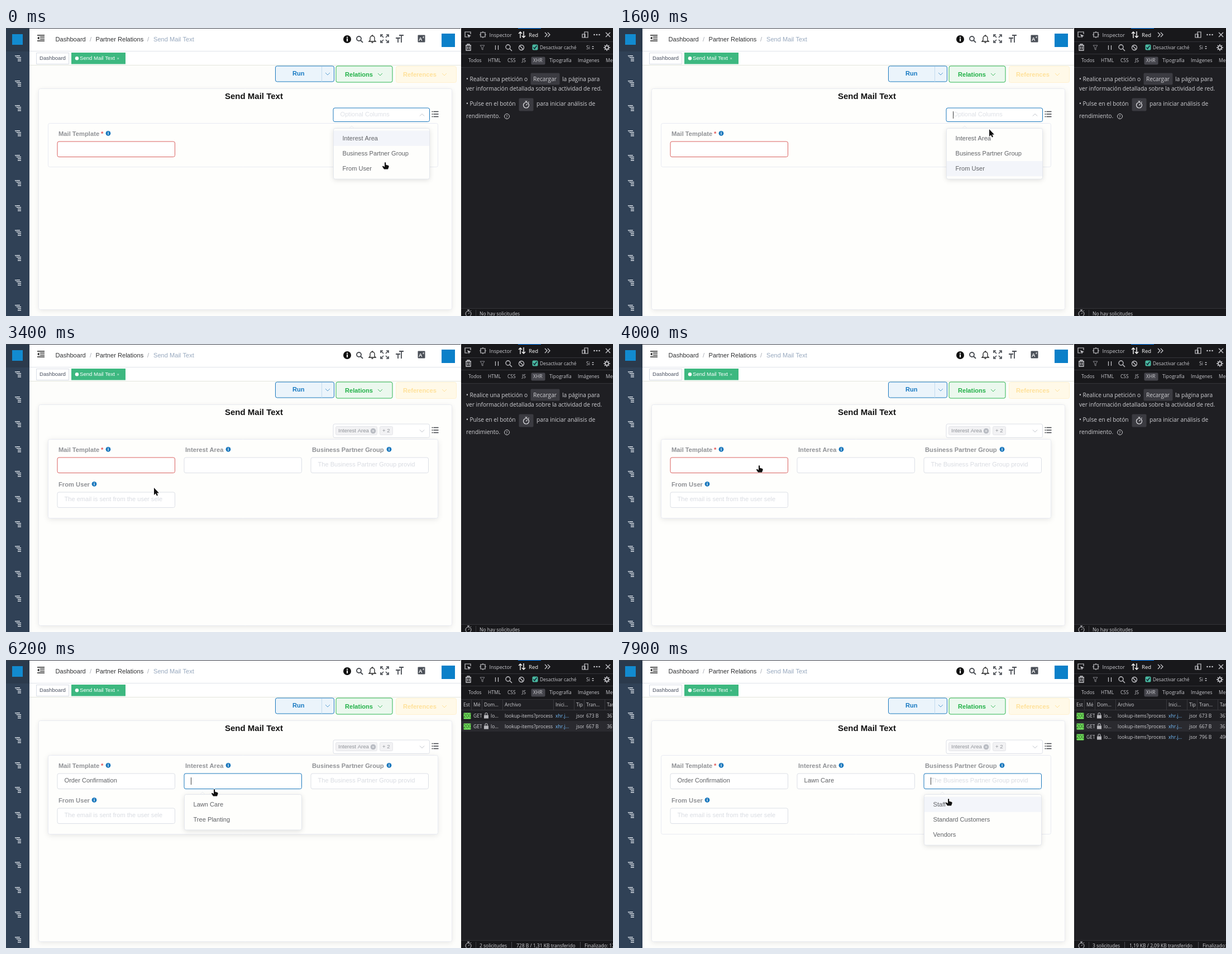
Recreate the animation shown at these times as an HTML page with a canvas. Size 1087 by 515 pixels, loop 8 s.

```html
<!DOCTYPE html>
<html lang="en">
<head>
<meta charset="utf-8">
<title>Send Mail Text</title>
<style>
html, body { margin: 0; width: 100%; height: 100%; overflow: hidden; background: #fff; }
canvas { display: block; width: 1087px; height: 515px; }
</style>
</head>
<body>
<canvas id="stage" width="1087" height="515"></canvas>
<script>
const g = document.getElementById('stage').getContext('2d');
const SANS = '"Liberation Sans", Arial, sans-serif';
const TOOL = '"Open Sans", "Noto Sans", sans-serif';
const BLUE = '#1a78bd', GREY = '#606266', EDGE = '#dcdfe6', PALE = '#d9dce2';
const LOOP = 8000, STEP = 100;

// Moments at which the interface changes
const PICK = [2000, 2350, 2750], COLS_CLOSE = 3000;
const MAIL = { open: 4400, pick: 5000 };
const AREA = { open: 5800, pick: 6600 };
const GROUP = { open: 7450, pick: LOOP };

const PATH = [
  [0, 678, 241], [300, 676, 248], [1200, 672, 246], [1500, 663, 181], [1700, 663, 181],
  [1900, 655, 198], [2100, 655, 198], [2300, 655, 224], [2400, 655, 224], [2600, 648, 250],
  [2800, 648, 250], [3400, 265, 257], [3600, 262, 250], [4000, 250, 218], [4400, 250, 218],
  [4700, 250, 256], [5000, 250, 258], [5500, 372, 220], [5900, 372, 222], [6200, 372, 232],
  [6450, 368, 256], [6600, 368, 258], [7100, 603, 215], [7400, 603, 216], [7900, 589, 249]
];

function pointer(t) {
  let i = 0;
  while (i < PATH.length - 2 && t >= PATH[i + 1][0]) i++;
  const [t0, x0, y0] = PATH[i], [t1, x1, y1] = PATH[i + 1];
  const p = Math.min(1, (t - t0) / (t1 - t0)), e = p * p * (3 - 2 * p);
  return { x: x0 + (x1 - x0) * e, y: y0 + (y1 - y0) * e };
}

function text(s, x, y, size, color, weight = 400, family = SANS) {
  g.font = `${weight} ${size}px ${family}`;
  g.fillStyle = color;
  g.fillText(s, x, y);
}
const tool = (s, x, y, color = '#d0d0d4', size = 8.5) => text(s, x, y, size, color, 400, TOOL);

function rect(x, y, w, h, color) {
  g.fillStyle = color;
  g.fillRect(x, y, w, h);
}

function box(x, y, w, h, fill, edge, r = 3, lw = 1) {
  g.beginPath();
  g.roundRect(x + .5, y + .5, w - 1, h - 1, r);
  if (fill) { g.fillStyle = fill; g.fill(); }
  if (edge) { g.strokeStyle = edge; g.lineWidth = lw; g.stroke(); }
}

function shadowBox(x, y, w, h, edge, alpha, blur) {
  g.save();
  g.shadowColor = `rgba(0,0,0,${alpha})`;
  g.shadowBlur = blur;
  g.shadowOffsetY = 2;
  box(x, y, w, h, '#fefefc');
  g.restore();
  box(x, y, w, h, '#fefefc', edge);
}

function disc(x, y, r, color) {
  g.beginPath();
  g.arc(x, y, r, 0, 7);
  g.fillStyle = color;
  g.fill();
}

// SVG path placed at x, y; stroked unless lw is 0
function icon(d, x, y, color, lw = 1.2) {
  const p = new Path2D(d);
  g.save();
  g.translate(x, y);
  g.lineWidth = lw;
  g.strokeStyle = g.fillStyle = color;
  lw ? g.stroke(p) : g.fill(p);
  g.restore();
}

const chevron = (x, y, color, up) => icon(up ? 'M-4 2L0-2L4 2' : 'M-4-2L0 2L4-2', x, y, color, 1);
const SEARCH = 'M4 0A4 4 0 1 1-4 0A4 4 0 1 1 4 0M3 3L7 7';
const WATCH = 'M5 1A5 5 0 1 1-5 1A5 5 0 1 1 5 1M-2-6H2M0-6V-4M0 1L2-1M4-4L5-5';
const RING = 'M4.5 0A4.5 4.5 0 1 1-4.5 0A4.5 4.5 0 1 1 4.5 0';

function info(x, y, r = 4.4, color = BLUE) {
  disc(x, y, r, color);
  const k = r / 4.4;
  rect(x - .6 * k, y - .8 * k, 1.3 * k, 3.2 * k, '#fff');
  rect(x - .6 * k, y - 2.7 * k, 1.3 * k, 1.2 * k, '#fff');
}

function sidebar() {
  rect(0, 0, 42, 515, '#304156');
  rect(0, 0, 42, 42, '#2b3a4c');
  rect(11, 11, 19, 19, '#128bd0');
  for (let i = 0; i < 11; i++) {
    const y = Math.round(54 + i * 44.6) - 5;
    rect(16, y, 9, 1.4, '#e3e8ee');
    rect(17.5, y, 1, 4, '#8c99a8');
    for (let k = 1; k < 4; k++) rect(k === 1 ? 19 : 21, y + k * 3, k === 1 ? 8 : 6, 1.4, '#e3e8ee');
  }
}

function navbar() {
  icon('M-6-5H7M-1-1.7H7M-1 1.7H7M-6 5H7', 62, 18, '#222', 1.5);
  icon('M-6 0L-2.5-3V3Z', 62, 18, '#222', 0);
  text('Dashboard', 88.5, 24, 11.1, '#303133');
  text('/', 150, 24, 11.1, '#a5a9b2');
  text('Partner Relations', 160.5, 24, 11.1, '#303133');
  text('/', 253, 24, 11.1, '#a5a9b2');
  text('Send Mail Text', 264, 24, 11.1, '#97a8be');
  info(611, 20, 7, '#111');
  icon(SEARCH, 632, 19, '#4b4f55', 1.9);
  icon('M-6 4H6L4 2V-2A4 4 0 0 0-4-2V2ZM-1.5 6H1.5M0-6V-8', 656, 20, '#222', 1.3);
  icon('M-7-3V-7H-3M3-7H7V-3M7 3V7H3M-3 7H-7V3M-6-6L-2-2M6-6L2-2M6 6L2 2M-6 6L-2 2', 678, 19, '#4b4f55', 1.7);
  icon('M-7-1H1M-3-1V7M-1-6H7M3-6V7', 705, 19, '#4b4f55', 1.8);
  box(737, 12, 14, 14, '#4b5058', null, 1);
  text('A', 739, 23, 9, '#fff', 700);
  text('z', 746, 18, 6, '#fff', 700);
  rect(780, 10, 24, 24, '#0b80c9');
  rect(42, 41, 773, 1, '#dfe3ea');
  box(54, 44, 59, 21, '#fff', '#d8dce5', 0);
  text('Dashboard', 60, 57, 9.6, '#495060');
  rect(117, 44, 97, 20.5, '#3db880');
  disc(127, 54.2, 3.2, '#fff');
  text('Send Mail Text', 132, 57, 9.6, '#fff');
  text('×', 198.5, 57, 7.5, '#d6f2e4');
  rect(42, 66, 773, 1, '#e3e6dc');
}

function actions() {
  box(482, 67.5, 106, 29, '#ebf4fb', BLUE, 3);
  rect(565, 69, 1, 27, '#c3dcef');
  text('Run', 513, 85, 11.1, '#1779c2', 700);
  chevron(576, 82, '#5a9fd2');
  box(590.5, 67.5, 102, 30, '#ebf8ee', '#2cb550', 3);
  text('Relations', 607, 87, 11.1, '#22b148', 700);
  chevron(670, 83, '#45bb64');
  box(698, 68, 109, 30, '#fff9e8', '#fff1cf', 3);
  text('References', 711, 87, 11.1, '#ffe19a', 700);
  chevron(785, 83, '#ffe19a');
}

function label(s, x, y, mark, required) {
  text(s, x, y, 11.2, '#909296', 700);
  if (required) text('*', 170, y, 11.2, '#e05656', 700);
  info(mark, y - 4.7);
}

function field(x, y, edge, value, hint, caret) {
  box(x - .5, y - .5, 211.5, 28.5, '#fff', edge, 3);
  if (value) text(value, x + 12.5, y + 16, 11.1, GREY);
  else if (hint) text(hint, x + 12.5, y + 16, 11.1, PALE);
  if (caret) rect(x + 12, y + 7, 1, 13, '#444');
}

function popup(x, y, w, items, hover, chosen = 0) {
  const h = items.length * 27.2 + 10;
  shadowBox(x, y, w, h, '#e4e7ed', .13, 10);
  icon('M-5 1L0-4L5 1', x + 33, y, '#e8ebf0', 1);
  items.forEach((s, i) => {
    const top = y + 4.5 + i * 27.2;
    if (i === hover) rect(x + 1, top, w - 2, 27.2, '#f3f5fa');
    const on = i < chosen;
    text(s, x + 16.5, Math.round(top + 17.2), 11.1, on ? BLUE : GREY, on ? 700 : 400);
    if (on) icon('M-4 0L-1 3L4-3', x + w - 16, top + 14, BLUE, 1.2);
  });
}

function tag(x, w, s) {
  box(x, 147, w, 16, '#f2f2f4', '#e4e5e9', 2);
  text(s, x + 5, 158, 9.6, '#909399');
}

const blink = (t, start) => (t - start) % 1000 < 500;
const isOpen = (list, t) => t >= list.open && t < list.pick;
const rowAt = (y, top) => y < top ? -1 : Math.floor((y - top) / 27.2);

function form(t, m) {
  const picked = PICK.filter(p => t >= p).length;
  const colsOpen = t < COLS_CLOSE;
  const anyList = [MAIL, AREA, GROUP].some(l => isOpen(l, t));
  const bottom = picked > 2 ? 312 : 249;

  shadowBox(58, 108, 741, 396, '#e9ebf1', .09, 10);
  text('Send Mail Text', 392, 127, 15, '#111', 700);

  const inside = m.x > 75 && m.x < 774 && m.y > 170 && m.y < bottom;
  const lifted = inside && !colsOpen && !(anyList && m.y > 239);
  shadowBox(75, 170, 699, bottom - 170, '#e8eaf2', lifted ? .1 : 0, 11);

  box(585.5, 142.5, 173.5, 25.5, '#fff', colsOpen ? BLUE : EDGE, 3);
  if (picked) {
    tag(590, 75, 'Interest Area');
    disc(657.5, 155.5, 4.8, '#b9bcc3');
    icon('M-1.5-1.5L1.5 1.5M1.5-1.5L-1.5 1.5', 657.5, 155.5, '#fff', .9);
    if (picked > 1) tag(669, 24, '+ ' + (picked - 1));
  } else {
    text('Optional Columns', 598.5, 158, 11.1, '#dde0e6');
  }
  if (colsOpen && blink(t, -700)) rect(picked ? 698 : 598, 149, 1, 13, '#444');
  chevron(745, 155.5, '#bcc0c8', colsOpen);
  icon('M-3-4.5H6M-3 0H6M-3 4.5H6M-6-4.5H-4M-6 0H-4M-6 4.5H-4', 768.5, 154, '#3c3f44', 1.7);

  label('Mail Template', 94, 193, 183, true);
  field(92, 203, t < MAIL.pick ? '#d9605f' : EDGE, t >= MAIL.pick && 'Order Confirmation', '',
    isOpen(MAIL, t) && blink(t, MAIL.open));
  if (picked) {
    label('Interest Area', 321, 193, 398);
    const focus = t >= AREA.open && t < GROUP.open;
    field(319, 203, focus ? BLUE : EDGE, t >= AREA.pick && 'Lawn Care', '',
      isOpen(AREA, t) && blink(t, AREA.open));
  }
  if (picked > 1) {
    label('Business Partner Group', 548, 193, 686);
    const over = m.x > 546 && m.x < 757 && m.y > 203 && m.y < 231;
    field(546, 203, t >= GROUP.open ? BLUE : over ? '#c0c4cc' : EDGE, '',
      'The Business Partner Group provid', t >= GROUP.open && blink(t, GROUP.open));
  }
  if (picked > 2) {
    label('From User', 94, 255, 158);
    field(92, 265, EDGE, '', 'The email is sent from the user sele');
  }

  if (colsOpen) {
    const hover = t < 200 ? 0 : t < 1700 ? 2 : rowAt(m.y, 183.5);
    popup(586, 179, 173, ['Interest Area', 'Business Partner Group', 'From User'], hover, picked);
  }
  const hover = rowAt(m.y, 244.5);
  if (isOpen(MAIL, t)) popup(92, 240, 211, ['Order Confirmation', 'Password Reset'], hover);
  if (isOpen(AREA, t)) popup(319, 240, 211, ['Lawn Care', 'Tree Planting'], hover);
  if (isOpen(GROUP, t)) popup(546, 240, 211, ['Staff', 'Standard Customers', 'Vendors'], hover);
}

function toolbars() {
  const c = '#c9c9ce';
  rect(815, 0, 272, 515, '#1f1f23');
  rect(815, 0, 272, 70, '#18181b');
  for (const y of [24, 46, 70]) rect(815, y, 272, 1, '#343439');
  rect(917, 0, 41, 1, '#0a84ff');

  icon('M0 4H-5V-5H5V-1', 827, 12, c);
  icon('M-1-1L6 2L3 3L2 6Z', 827, 12, c, 0);
  icon('M-4-4H4V4H-4ZM0-6V-4M0 4V6M-6 0H-4M4 0H6', 854, 12, c);
  tool('Inspector', 865.5, 16, c, 9.2);
  icon('M-3 6V-5M-6-2L-3-5L0-2M3-6V5M0 2L3 5L6 2', 924, 12, '#fff', 1.4);
  tool('Red', 936, 16, '#fff', 9.6);
  icon('M-5-4L-1 0L-5 4M0-4L4 0L0 4', 970, 12, c, 1.3);
  icon('M-1-5H5V5H-1ZM-5-1H0V5H-5Z', 1037, 12, c);
  for (let i = -1; i < 2; i++) disc(1058 + i * 4.5, 12, 1.3, c);
  icon('M-4-4L4 4M4-4L-4 4', 1078, 12, c, 1.3);

  icon('M-5-4H5M-2-4V-6H2V-4M-4-4V5H4V-4M-1.5-2V3M1.5-2V3', 828, 35, c, 1.3);
  icon('M-4-4H4L1 0V4L-1 3V0Z', 853, 35, '#85858b', 1);
  icon('M-2.5-4V4M2.5-4V4', 879, 35, c);
  icon(SEARCH, 899, 34, c, 1.3);
  icon(RING + 'M-3-3L3 3', 923, 35, c, 1.3);
  box(942, 29, 11, 11, '#49b8a0', null, 2);
  icon('M-3 0L-1 2.5L3-3', 947.5, 34.5, '#123', 1.5);
  tool('Desactivar caché', 956, 38, c, 8.4);
  tool('Si', 1039, 38, c);
  icon('M-2-1L0-3L2-1ZM-2 1L0 3L2 1Z', 1051, 35, c, 0);
  icon('M3 0A3 3 0 1 1-3 0A3 3 0 1 1 3 0M0-6V-3M0 3V6M-6 0H-3M3 0H6M-4-4L-2-2M2 2L4 4M4-4L2-2M-2 2L-4 4', 1076, 35, c, 1.6);

  box(940, 51, 26, 15, '#45454c', null, 2);
  const tabs = { Todos: 828, HTML: 863, CSS: 898, JS: 924, XHR: 944, Tipografía: 973, Imágenes: 1024, Me: 1074 };
  for (const name in tabs) tool(name, tabs[name], 61, c);
}

function emptyNetwork() {
  const c = '#cfcfd3', say = (s, x, y) => tool(s, x, y, c, 10.2);
  say('• Realice una petición o', 824, 95);
  box(939, 80, 53, 22, '#3b3b41', null, 2);
  say('Recargar', 944, 95);
  say('la página para', 996, 95);
  say('ver información detallada sobre la actividad de red.', 824, 112);
  say('• Pulse en el botón', 824, 139);
  box(918, 125, 27, 24, '#3b3b41', null, 2);
  icon(WATCH, 931.5, 137, '#e6e6ea');
  say('para iniciar análisis de', 950, 139);
  say('rendimiento.', 824, 161);
  icon(RING, 897, 158, c, 1);
  tool('?', 895, 161, c, 8);
}

function cells(list, y, colors = {}) {
  const left = [819, 837, 856, 893, 984, 1021, 1039, 1076];
  list.forEach((s, i) => {
    g.save();
    g.beginPath();
    g.rect(left[i] - 3, y - 14, (left[i + 1] || 1091) - left[i] - 1, 20);
    g.clip();
    tool(s, left[i] + (i === 2 && colors[0] ? 12 : 0), y, colors[i]);
    g.restore();
  });
}

function requests(n) {
  rect(815, 89, 272, 1, '#38383d');
  for (const x of [833, 852, 889, 980, 1017, 1035, 1072]) rect(x, 71, 1, 18, '#38383d');
  cells(['Est', 'Mé', 'Dom…', 'Archivo', 'Inici…', 'Tip', 'Tran…', 'Tamaño'], 83);
  const sizes = [['673 B', '367 B'], ['667 B', '361 B'], ['796 B', '490 B']];
  for (let i = 0; i < n; i++) {
    const y = Math.round(90 + i * 19.2);
    if (i === 1) rect(815, y, 272, 19, '#2a2a2f');
    box(819, y + 4, 14, 12, '#74e45e', null, 1);
    cells(['200', 'GET', 'lo…', 'lookup-items?process', 'xhr.j…', 'json', ...sizes[i]], y + 13,
      { 0: '#1f4a1a', 4: '#75bfff' });
    rect(856, y + 8.5, 8, 6, '#b5b5ba');
    icon('M-2 1V-1A2 2 0 0 1 2-1V1', 860, y + 7.5, '#b5b5ba');
  }
}

function footer(n) {
  rect(815, 502, 272, 13, '#18181b');
  rect(815, 501, 272, 1, '#343439');
  icon(WATCH, 828, 510, '#c9c9ce', 1);
  rect(841, 504, 1, 11, '#38383d');
  if (!n) return tool('No hay solicitudes', 848, 514);
  const [count, sent, a, b] = [
    ['Una solicitud', '367 B / 673 B transferido', 907, 1023],
    ['2 solicitudes', '728 B / 1,31 KB transferido', 905, 1028],
    ['3 solicitudes', '1,19 KB / 2,09 KB transferido', 905, 1037]
  ][n - 1];
  tool(count, 848, 514);
  rect(a, 504, 1, 11, '#4a4a50');
  tool(sent, a + 9, 514);
  rect(b, 504, 1, 11, '#4a4a50');
  tool('Finalizado: 12,4 s', b + 8, 514);
}

function cursor(t, m) {
  const select = m.x > 586 && m.x < 759 && t < COLS_CLOSE && m.y > 183;
  const inputs = m.y > 203 && m.y < 234 && (m.x < 303 || m.x > 319);
  const list = [MAIL, AREA, GROUP].some(l => isOpen(l, t)) && m.y > 232;
  const hand = select || t > 3600 && (inputs || list);
  const d = hand
    ? 'M0 0Q1-2 2.2 0V3.5L7 5Q8 5.5 7.5 7.5L6 11.5H-1L-4 7Q-4 5-2 6L0 7.5Z'
    : 'M0 0V13L3 10.3L5 14.5L7 13.5L5.2 9.5H9Z';
  icon(d, m.x, m.y, '#fff', 1.6);
  icon(d, m.x, m.y, '#111', 0);
}

function draw(t) {
  const m = pointer(t);
  const n = [MAIL, AREA, GROUP].filter(l => t >= l.open).length;
  rect(0, 0, 1087, 515, '#fdfdfb');
  rect(42, 0, 773, 66, '#fff');
  sidebar();
  navbar();
  rect(0, 0, 814, 1, '#3a3f4a');
  actions();
  form(t, m);
  toolbars();
  n ? requests(n) : emptyNetwork();
  footer(n);
  cursor(t, m);
}

const begin = performance.now();
function tick() {
  const t = (performance.now() - begin) % LOOP;
  draw(Math.floor(t / STEP) * STEP);
  requestAnimationFrame(tick);
}
tick();
</script>
</body>
</html>
```
